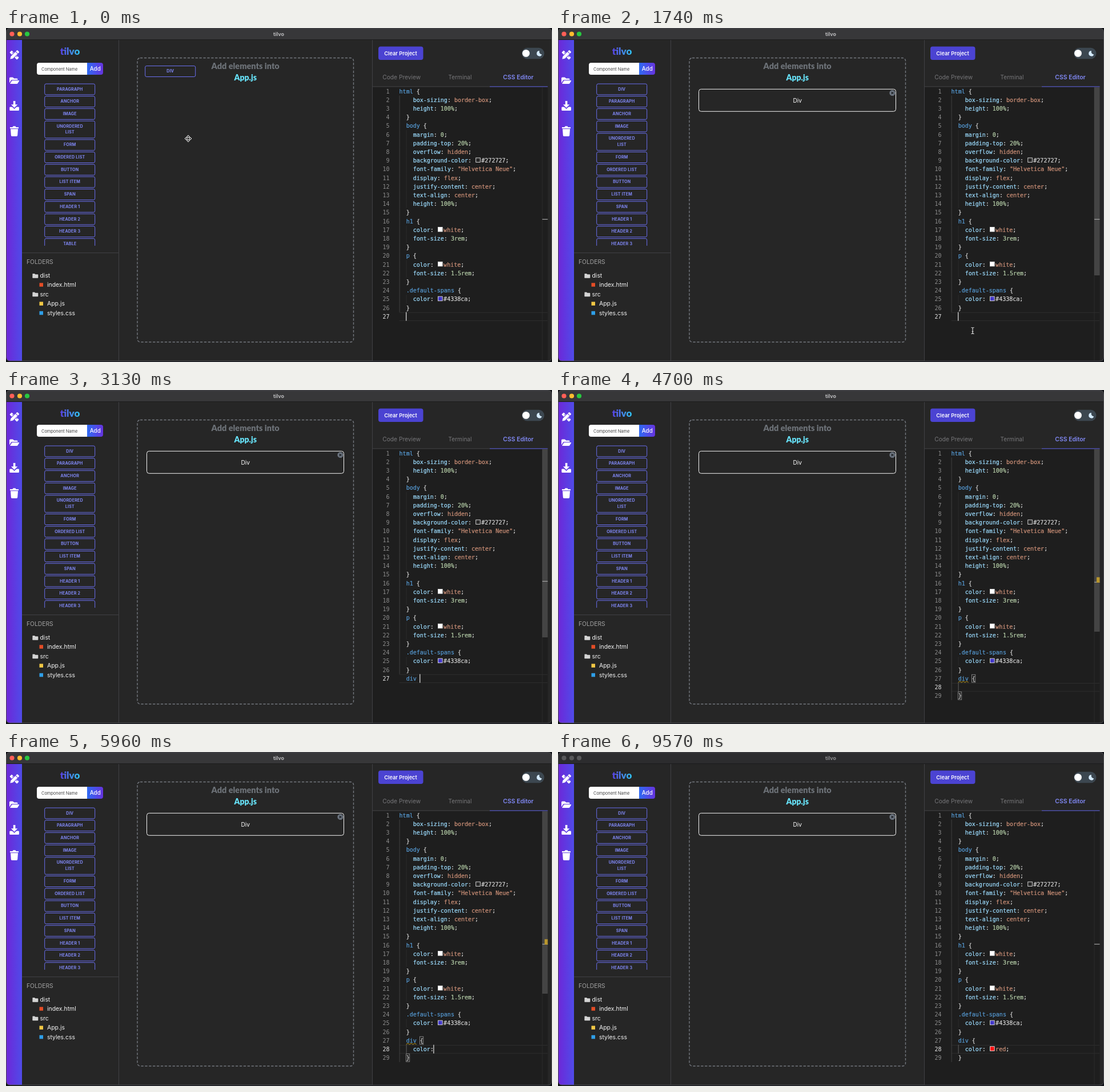
Write an HTML page that moves like this. It is 956 px wide and 586 px high and loops after 9.65 s.

```html
<!DOCTYPE html>
<html lang="en">
<head>
<meta charset="utf-8">
<title>tilvo</title>
<style>
html,body{margin:0;width:100%;height:100%;overflow:hidden;background:#121418}
svg{display:block;width:956px;height:586px}
text{white-space:pre;font-family:Inter,"Liberation Sans",sans-serif}
.code text{font:10px "DejaVu Sans Mono","Liberation Mono",monospace}
.brand text{font-family:Lato,"Open Sans",sans-serif;font-weight:900}
</style>
</head>
<body>
<svg id="stage" viewBox="0 0 956 586">
  <defs>
    <linearGradient id="side"><stop stop-color="#6d28d9"/><stop offset="1" stop-color="#4f4be8"/></linearGradient>
    <linearGradient id="add"><stop stop-color="#2f6bf3"/><stop offset="1" stop-color="#6633de"/></linearGradient>
    <linearGradient id="logo"><stop stop-color="#5b3fe6"/><stop offset="1" stop-color="#2fc4f0"/></linearGradient>
    <clipPath id="listClip"><rect x="60" y="96" width="110" height="286"/></clipPath>
  </defs>
</svg>
<script>
const NS = 'http://www.w3.org/2000/svg';
const stage = document.getElementById('stage');
const LOOP = 9650, CH = 6.02, LINE = 15.2, TOP = 103.3, CODE_X = 688.6, SWATCH = 11.3;

function el(tag, attrs, parent = stage) {
  const n = document.createElementNS(NS, tag);
  for (const k in attrs) n.setAttribute(k, attrs[k]);
  parent.appendChild(n);
  return n;
}
const rect = (x, y, width, height, fill, more, parent) =>
  el('rect', { x, y, width, height, fill, ...more }, parent);
const path = (d, fill, more, parent) => el('path', { d, fill, ...more }, parent);
const circle = (cx, cy, r, fill, parent) => el('circle', { cx, cy, r, fill }, parent);
// y is the vertical middle of the capitals
function label(str, x, y, size, fill, more, parent) {
  const n = el('text', { x, y: y + size * .36, 'font-size': size, fill, ...more }, parent);
  n.textContent = str;
  return n;
}
const group = (attrs = {}, parent) => el('g', attrs, parent);
const show = (n, on) => n.setAttribute('display', on ? 'inline' : 'none');
const MID = { 'text-anchor': 'middle' };
const BOLD = { ...MID, 'font-weight': 600 };
const heavy = (color, width = .22) => ({ stroke: color, 'stroke-width': width });

// window
rect(1, 1, 954, 583, '#262626', { rx: 6 });
const titleBar = path('M1 20.5V7q0-6 6-6h942q6 0 6 6v13.5z', '#373739');
rect(1, 20, 954, 1, '#1b1b1c');
const lights = [10.5, 24, 37].map(x => circle(x, 10.5, 4.1, '#fff'));
const LIGHTS = ['#ff5f57', '#febc2e', '#28c840'];
const title = label('tilvo', 477.5, 10.3, 9, '#b9b9bb', { ...MID, 'font-weight': 700 });

// side bar
path('M1 21H28V584H7q-6 0-6-6z', 'url(#side)');
const tools = group({ transform: 'translate(14.5 47.5)' });
for (const turn of [45, -45]) {
  const g = group({ transform: `rotate(${turn})` }, tools);
  if (turn > 0) {
    rect(-9, -2.6, 18, 5.2, '#fff', { rx: 1 }, g);
    path('M-5-2.6v2.4M-1.6-2.6v2.4M5-2.6v2.4', 'none', { stroke: '#5f3ae0' }, g);
  } else {
    rect(-9.5, -3.6, 19, 7.2, '#5f3ae0', {}, g);
    path('M-10 0l4-2.6H9q1 0 1 1v3.2q0 1-1 1H-6z', '#fff', {}, g);
    path('M6-2.6v5.2', 'none', { stroke: '#5f3ae0' }, g);
  }
}
path('M6 96.5V88q0-1.5 1.5-1.5h4.5l2 2h5q1.5 0 1.5 1.5v1H10.5q-1.2 0-1.8 1z', '#fff');
path('M7 98l3-5.2q.4-.8 1.4-.8h11.2q.9 0 .4.9l-2.6 4.3q-.5.8-1.4.8z', '#fff');
path('M12.8 128h3.6v6.2h3.9l-5.7 5.8-5.7-5.8h3.9z', '#fff');
path('M7.5 138.5h3.2l3.9 3.4 3.9-3.4h3.2q1.2 0 1.2 1.2v4q0 1.3-1.2 1.3H7.5q-1.2 0-1.2-1.3v-4q0-1.2 1.2-1.2z', '#fff');
path('M7 174h4.5l1-1.7h4l1 1.7H22v2.2H7zM8 177.3h13l-.8 11q-.1 1.7-1.6 1.7h-8.2q-1.5 0-1.6-1.7z', '#fff');
rect(.5, .8, 955, 583.4, 'none', { rx: 6, stroke: '#57575b', 'stroke-width': .9 });

// component panel
rect(197, 21, 1, 563, '#404044');
rect(28, 394, 169, 1, '#404044');
const brand = group({ class: 'brand' });
label('tilvo', 112, 40.5, 17, 'url(#logo)', MID, brand);
path('M58 61h84v21H58q-4 0-4-4V65q0-4 4-4z', '#fff');
label('Component Name', 62, 72.5, 7.4, '#444');
path('M142 61h24q4 0 4 4v13q0 4-4 4h-24z', 'url(#add)');
label('Add', 156.2, 71.6, 9.8, '#fff', { ...MID, 'font-weight': 500 });

function chip(lines, x, y, parent) {
  const h = 20 + (lines.length - 1) * 11;
  rect(x + .5, y + .5, 88, h - 1, 'none', { rx: 2.5, stroke: '#6a6ff0' }, parent);
  lines.forEach((s, i) => label(s, x + 44.6, y + 9.5 + i * 10.6, 7.1, '#8189f6',
    { ...BOLD, ...heavy('#8189f6', .15), 'letter-spacing': .22 }, parent));
  return h + 1.7;
}
const clip = group({ 'clip-path': 'url(#listClip)' });
const list = group({}, clip);
const divChip = group({}, list);
chip(['DIV'], 67.2, 97.5, divChip);
let chipY = 119.2;
for (const name of ['PARAGRAPH', 'ANCHOR', 'IMAGE', 'UNORDERED|LIST', 'FORM', 'ORDERED LIST', 'BUTTON',
  'LIST ITEM', 'SPAN', 'HEADER 1', 'HEADER 2', 'HEADER 3', 'TABLE'])
  chipY += chip(name.split('|'), 67.2, chipY, list);

label('FOLDERS', 36, 410, 10.3, '#a3a3a3');
const folder = y => path(`M46.5 ${y - 4}h3.6l1.2 1.2h4.2q.8 0 .8.8v5q0 .8-.8.8h-8.4q-.8 0-.8-.8z`, '#d4d4d4');
folder(435); folder(467.5);
label('dist', 59.5, 434.7, 10.4, '#f5f5f5');
label('src', 59.5, 467.7, 10.4, '#f5f5f5');
[['index.html', 450.5, '#e44d26'], ['App.js', 483.6, '#f2c744'], ['styles.css', 500, '#2f9fe8']].forEach(([s, y, c]) => {
  rect(58.5, y - 3.2, 6.5, 6.5, c);
  label(s, 72, y, 10.4, '#f5f5f5');
});

// canvas
rect(230, 52.5, 378.5, 498.5, 'none', { rx: 5, stroke: '#73777e', 'stroke-width': 1.4, 'stroke-dasharray': '4.3 2.6' });
label('Add elements into', 419.2, 67.1, 14.5, '#6d7278', MID, brand);
label('App.js', 419.2, 86.7, 14.1, '#67e3f9', MID, brand);
const dragged = group();
chip(['DIV'], 243.2, 66, dragged);
const dropped = group();
rect(246.5, 107.3, 345, 39, 'none', { rx: 4, stroke: '#f4f4f4' }, dropped);
label('Div', 419.2, 127.2, 10.2, '#fff', MID, dropped);
circle(585.4, 114, 5, '#6f7884', dropped);
path('M583.4 112l4 4m0-4l-4 4', 'none', { stroke: '#1f2226', 'stroke-width': 1.2 }, dropped);

// right panel
rect(641, 21, 1, 563, '#404044');
rect(652, 32.5, 78.5, 23.5, '#4b43d2', { rx: 4 });
label('Clear Project', 691, 44.5, 9.2, '#fff', BOLD);
rect(903, 34.8, 39.5, 19.5, '#3c4750', { rx: 9.7 });
circle(910.5, 44.4, 6.4, '#fff');
path('M934 40a4.7 4.7 0 1 0 4.3 6.4a4.6 4.6 0 0 1-4.3-6.4z', '#d6ecff');
label('Code Preview', 692.7, 86, 10.2, '#77777a', MID);
label('Terminal', 795, 86, 10.1, '#77777a', MID);
label('CSS Editor', 897, 86.5, 10.4, '#8189f6', BOLD);
rect(642, 102.5, 205, 1, '#48484c');
rect(847, 102.4, 101.5, 1.2, '#6468f0');

// editor
rect(642, 103.6, 306.5, 480, '#1e1e1e');
const code = group({ class: 'code' });
const lineHl = group();
for (const y of [.3, LINE - .7]) rect(CODE_X, y, 259.5, 1, '#2d2d2d', {}, lineHl);
const guides = group();
const lineTop = i => TOP + (i - 1) * LINE;
const colX = c => CODE_X + c * CH;

const BLUE = '#569cd6', PROP = '#9cdcfe', PLAIN = '#d4d4d4', VALUE = '#ce9178', NUM = '#b5cea8';
function tokens(str) {
  const m = /^([\w-]+)(:)( *)([^;]*)(;?)$/.exec(str);
  if (m) {
    const v = m[4];
    const c = v[0] === '#' ? PLAIN : /^\d/.test(v) ? NUM : VALUE;
    return [[m[1], PROP], [m[2] + m[3], PLAIN], [v, c], [m[5], PLAIN]];
  }
  const s = /^([.\w-]*)(.*)$/.exec(str);
  return [[s[1], BLUE], [s[2], PLAIN]];
}
function drawLine(g, i, col, str, swatch, plainWord) {
  g.replaceChildren();
  let x = colX(col);
  const mid = lineTop(i) + LINE / 2;
  tokens(str).forEach(([s, c], k) => {
    if (k === 2 && swatch) {
      rect(x + 1.7, mid - 4.6, 7.6, 7.6, swatch, { stroke: '#e6e6e6', 'stroke-width': .9 }, g);
      x += SWATCH;
    }
    const color = plainWord && c === BLUE ? PROP : c;
    if (s.trim()) label(s, x, mid, 10, color, heavy(color), g);
    x += s.length * CH;
  });
}
const sheet = `html {
box-sizing: border-box;
height: 100%;
}
body {
margin: 0;
padding-top: 20%;
overflow: hidden;
background-color: #272727;
font-family: "Helvetica Neue";
display: flex;
justify-content: center;
text-align: center;
height: 100%;
}
h1 {
color: white;
font-size: 3rem;
}
p {
color: white;
font-size: 1.5rem;
}
.default-spans {
color: #4338ca;
}`.split('\n');
const numbers = [];
function number(i) {
  numbers[i] = label(i, 671.6, lineTop(i) + LINE / 2, 10, '#8c8c8c', { 'text-anchor': 'end' }, code);
}
sheet.forEach((s, k) => {
  const i = k + 1, isProp = /;$/.test(s);
  const sw = /color: (.*);/.exec(s);
  drawLine(group({}, code), i, isProp ? 4 : i === 1 ? 0 : 2, s, sw && sw[1]);
  number(i);
  if (i > 1) rect(688.6, lineTop(i), 1, LINE, '#404040', {}, guides);
  if (isProp && i > 3) rect(700.6, lineTop(i), 1, LINE, '#2b2b2b', {}, guides);
});
[27, 28, 29].forEach(number);
const live = [27, 28, 29].map(() => group({}, code));
const innerGuides = group();
rect(688.6, lineTop(27), 1, LINE * 3, '#404040', {}, innerGuides);
rect(700.6, lineTop(28), 1, LINE, '#606060', {}, innerGuides);

// scroll gutter
rect(938.5, 104, 1, 479.5, '#2c2c2c');
const thumb = rect(939, 104, 9.5, 330, '#797979', { 'fill-opacity': .42 });
const ruler = rect(939, 335, 9.5, 1.2, '#a5a5a5');

function bracket(line, col) {
  return rect(colX(col) - .2, lineTop(line) + .8, CH + .2, LINE - 1.6, 'none', { stroke: '#8a8a8a', 'stroke-width': .9 });
}
const brackets = [bracket(27, 6), bracket(27, 7), bracket(29, 2)];
function squiggle(line, col, len, stroke, parent) {
  let d = `M${colX(col)} ${lineTop(line) + 14.6}`;
  for (let k = 0; k < len * 2; k++) d += `l3 ${k % 2 ? 2 : -2}`;
  path(d, 'none', { stroke }, parent);
}
function problem(line, col, len, color, mark, markY) {
  const g = group();
  squiggle(line, col, len, color, g);
  rect(943, markY, 5.5, 9.5, mark, {}, g);
  return g;
}
const warn = problem(27, 2, 3, '#c9a21a', '#b8962e', 328.5);
const fail = problem(29, 2, 1, '#e5473c', '#c0392f', 345.5);
const caret = rect(0, 0, 1.3, LINE, '#d8d8d8');

// suggestion row
const hint = group({ class: 'code' });
rect(659, 0, 285.5, 16.4, '#08456f', {}, hint);
const redIcon = rect(664.8, 4.7, 6.4, 6.4, '#f00505', { stroke: '#2a0a0a', 'stroke-width': .7 }, hint);
const wordIcon = path('M664.5 5h7M664.5 8h4.5M664.5 11h7', 'none', { stroke: '#c8c8c8' }, hint);
const hintText = label('', 679, 7.9, 10, '#2aaaff', { ...heavy('#2aaaff', .4), style: 'font-weight:700' }, hint);

// pointers
const mover = group();
path('M0-6l2.4 2.8H1v2.2h2.2v-1.4L6 0 3.2 2.4V1H1v2.2h1.4L0 6l-2.4-2.8H-1V1h-2.2v1.4L-6 0l2.8-2.4V-1H-1v-2.2h-1.4z',
  '#111', { stroke: '#fff' }, mover);
const arrow = group();
path('M0 0v11.5l2.7-2.5 1.8 4.2 2-.9-1.8-4.1h3.8z', '#000', { stroke: '#fff' }, arrow);
const beam = group();
path('M-2.5-5.5q2.5 0 2.5 1.5V4q0 1.5-2.5 1.5M2.5-5.5q-2.5 0-2.5 1.5V4q0 1.5 2.5 1.5M-1.3 1.5h2.6',
  'none', { stroke: '#e2e2e2', 'stroke-width': 1.1 }, beam);

// typing: time, line 27, line 28 (null until Enter), caret column
const keys = [[-400, '', null, 2]];
const press = (t, a, b) => keys.push([t, a, b, b === null ? 2 + a.replace('}', '').length : 4 + b.length]);
press(2430, 'd', null);
press(2560, 'di', null);
press(2690, 'div', null);
press(3130, 'div ', null);
press(3570, 'div {}', null);
press(4220, 'div {', '');
[5390, 5570, 5650, 5740, 5830, 5960, 6040, 7480, 7570, 7660, 7870].forEach((t, i) =>
  press(t, 'div {', 'color: red;'.slice(0, i + 1)));

const ramp = (t, a, b) => Math.min(1, Math.max(0, (t - a) / (b - a)));
const smooth = p => p * p * (3 - 2 * p);
let drawn = '';

function render(t) {
  const drop = t >= 120, blur = t >= 9090;
  const [last, a, b, col] = keys.filter(k => k[0] <= t).pop();
  const open = b !== null, swatch = t >= 8700 ? '#ff1010' : null;

  lights.forEach((n, i) => n.setAttribute('fill', blur ? '#58585a' : LIGHTS[i]));
  titleBar.setAttribute('fill', blur ? '#2c2c2e' : '#373739');
  title.setAttribute('fill', blur ? '#8d8d8f' : '#b9b9bb');
  show(divChip, drop);
  list.setAttribute('transform', `translate(0 ${drop ? 0 : -21.7})`);
  show(dragged, !drop);
  show(dropped, drop);

  const state = a + '|' + b + swatch;
  if (state !== drawn) {
    drawn = state;
    drawLine(live[0], 27, 2, a);
    drawLine(live[1], 28, 4, b || '', swatch, true);
    drawLine(live[2], 29, 2, open ? '}' : '');
  }
  const active = open ? 28 : 27;
  for (const i of [27, 28, 29]) {
    show(numbers[i], i === 27 || open);
    numbers[i].setAttribute('fill', i === active ? '#e4e4e4' : '#8c8c8c');
  }
  lineHl.setAttribute('transform', `translate(0 ${lineTop(active)})`);
  show(innerGuides, open);
  show(brackets[0], t >= 3570 && !blur);
  show(brackets[1], t >= 3570 && !open);
  show(brackets[2], open && !blur);
  show(warn, t >= 4090 && t < 6570);
  show(fail, t >= 6570 && t < 8390);

  show(caret, !blur && (t - last) % 960 < 480);
  caret.setAttribute('x', colX(col) - .6 + (swatch ? SWATCH : 0));
  caret.setAttribute('y', lineTop(active));

  thumb.setAttribute('height', open ? 320 : 330);
  thumb.setAttribute('opacity', ramp(t, 780, 900) * (1 - ramp(t, 9440, 9570)));
  ruler.setAttribute('y', open ? 336.6 : 335);

  const red = t >= 7570 && t < 7870;
  show(hint, red || (t >= 2560 && t < 3130));
  show(redIcon, red);
  show(wordIcon, !red);
  hintText.textContent = red ? 'red' : 'div';
  hint.setAttribute('transform', `translate(0 ${lineTop(active + 1) + .6})`);

  const p = smooth(ramp(t, 160, 1000));
  const x = 319 + 407 * p, y = 194 + 354 * p - 17 * smooth(ramp(t, 1000, 1170));
  const pointer = !drop ? mover : x < 642 ? arrow : beam;
  for (const n of [mover, arrow, beam]) show(n, n === pointer && t < 2430);
  pointer.setAttribute('transform', `translate(${x} ${y})`);
}

const start = performance.now();
function tick(now) {
  render(Math.max(0, now - start) % LOOP);
  requestAnimationFrame(tick);
}
render(0);
requestAnimationFrame(tick);
</script>
</body>
</html>
```
